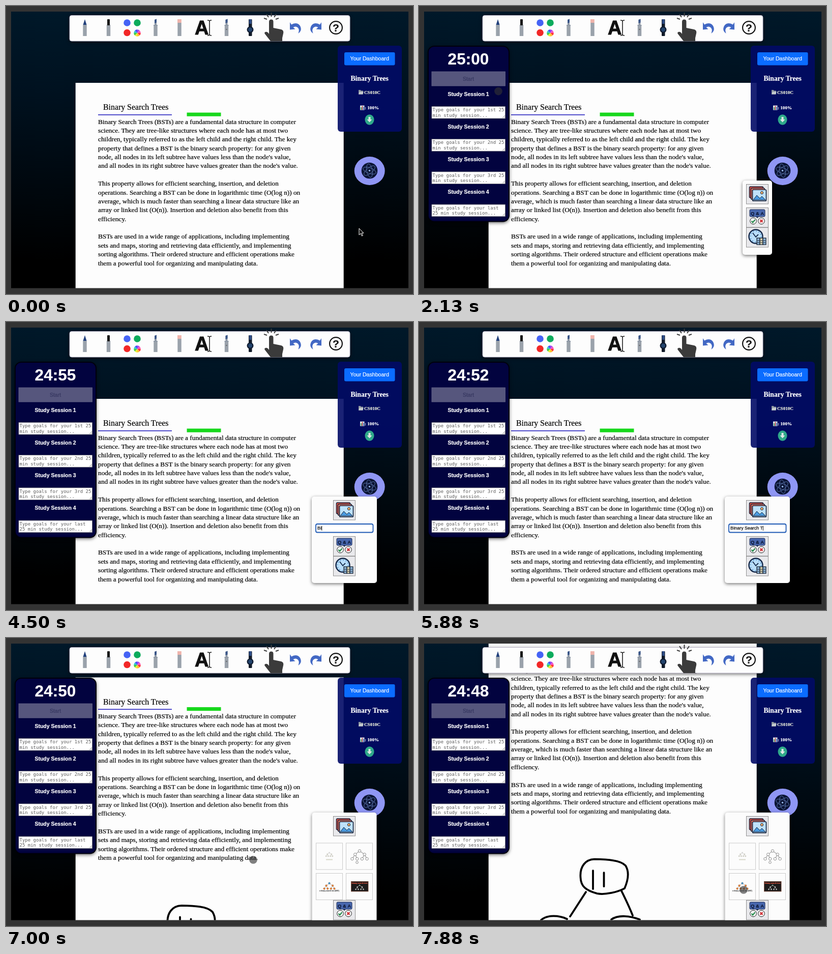
Animation of 800 by 566 pixels, one loop 8000 ms. Source, as an HTML page:

```html
<!DOCTYPE html>
<html lang="en">
<head>
<meta charset="utf-8">
<title>Study notes</title>
<style>
html, body { margin: 0; width: 100%; height: 100%; overflow: hidden; background: #333; }
svg { display: block; width: 800px; height: 566px; }
text { white-space: pre; fill: currentColor; stroke: currentColor; stroke-width: .2px; }
.serif { font-family: "Liberation Serif", serif; }
.sans { font-family: "Liberation Sans", sans-serif; }
.mono { font-family: "DejaVu Sans Mono", monospace; stroke: none; }
.bold { font-weight: bold; }
.mid { text-anchor: middle; }
.shadow { filter: drop-shadow(0 2px 3px #0008); }
.ink { fill: none; stroke: #000; stroke-width: 3.8; stroke-linecap: round; stroke-linejoin: round; }
</style>
</head>
<body>
<svg id="stage" viewBox="0 0 800 566"></svg>
<script>
const rect = (x, y, w, h, fill, more = '') =>
  `<rect x="${x}" y="${y}" width="${w}" height="${h}" fill="${fill}" ${more}/>`;
const disc = (x, y, r, fill, more = '') => `<circle cx="${x}" cy="${y}" r="${r}" fill="${fill}" ${more}/>`;
const path = (d, more = '') => `<path d="${d}" ${more}/>`;
const line = (d, color, width) => path(d, `fill="none" stroke="${color}" stroke-width="${width}"`);
const text = (x, y, size, cls, color, str, more = '') =>
  `<text x="${x}" y="${y}" font-size="${size}" class="${cls}" color="${color}" ${more}>${str}</text>`;
const group = (id, body, more = '') => `<g id="${id}" ${more}>${body}</g>`;

const notes = `Binary Search Trees (BSTs) are a fundamental data structure in computer
science. They are tree-like structures where each node has at most two
children, typically referred to as the left child and the right child. The key
property that defines a BST is the binary search property: for any given
node, all nodes in its left subtree have values less than the node's value,
and all nodes in its right subtree have values greater than the node's value.

This property allows for efficient searching, insertion, and deletion
operations. Searching a BST can be done in logarithmic time (O(log n)) on
average, which is much faster than searching a linear data structure like an
array or linked list (O(n)). Insertion and deletion also benefit from this
efficiency.

BSTs are used in a wide range of applications, including implementing
sets and maps, storing and retrieving data efficiently, and implementing
sorting algorithms. Their ordered structure and efficient operations make
them a powerful tool for organizing and manipulating data.`.split('\n');

function pageArt() {
  return rect(136.7, 151, 527, 900, '#fdfdfd')
    + text(191, 204.3, 15.85, 'serif', '#000', 'Binary Search Trees')
    + rect(181, 213, 145, 1.6, '#2a25c0')
    + rect(355.5, 209.5, 67, 7.2, '#17d81c')
    + notes.map((s, i) => text(181, 231.6 + i * 17.37, 13.28, 'serif', '#000', s)).join('')
    + path(`M317.500 635C316 614 327 600 345 599.500C370 600 396 601 406 612C414 625 411 641 404 657
      C391 664 366 670 350 667C328 661 318 653 317.500 635M342 622V658M363.500 626V653
      M328 664L297 712M398 662Q412 690 420 710
      M240 719C252 708 276 710 291 717M378 718C392 708 415 711 434 718`, 'class="ink"');
}

function toolbarArt() {
  const barrel = (x, tip) => rect(x - 3.7, 37, 7.4, 22, '#9aa2ab') + tip;
  const nib = x => path(`M${x - 2} 27l4-1.500V37h2v2h-8v-2h2z`, 'fill="#8e98a6"')
    + path(`M${x - 2} 27l4-1.500v7l-4 1.500z`, 'fill="#3a5688"');
  const pie = ['#f33', '#fb3', '#ee3', '#4c4', '#3cc', '#45f', '#a4e', '#f5b'].map((c, i) => {
    const p = a => `${258 + 6.8 * Math.cos(a)} ${53 + 6.8 * Math.sin(a)}`;
    return path(`M258 53L${p(i * Math.PI / 4)}A6.8 6.8 0 0 1 ${p((i + 1) * Math.PI / 4)}z`, `fill="${c}"`);
  }).join('');
  const undo = 'M558 32l3 4.500q13-6.500 18 4.500q3 8-4.500 13q3-9-1.500-12q-4-3-8.500 0l4 3.500-10.500 1z';
  return rect(125, 18.5, 551, 50.5, '#fdfdfd', 'rx="4" stroke="#b9b4c8" class="shadow"')
    + barrel(155, path('M155 26l3.5 11h-7z', 'fill="#22407c"'))
    + barrel(201.5, rect(199, 26, 5, 12, '#111', 'rx="1"'))
    + disc(238, 33, 6.8, '#4563f5') + disc(258, 33, 6.8, '#0cab5c')
    + disc(238, 52.5, 6.8, '#f22727') + pie
    + barrel(294, nib(294))
    + barrel(341, rect(337, 26, 7.8, 7, '#f0b4ac') + rect(337.3, 33, 7.4, 4, '#9aa2ab'))
    + text(371, 56, 38, 'sans bold', '#111', 'A', 'style="stroke-width:1px"')
    + line('M396 28q4 0 4 2q0-2 4-2M400 30V56M396 58q4 0 4-2q0 2 4 2', '#111', 1.5)
    + barrel(433.5, nib(433.5) + disc(433.5, 46, 1.2, '#666'))
    + rect(477, 26, 6.5, 33, '#111a28', 'rx="1"') + rect(478, 26, 4.5, 9, '#2d4c86')
    + disc(480, 46.5, 6.5, '#101c30') + disc(480, 46.5, 4, '#24456e')
    + path('M517 55V31q0-4.500 4.300-4.500T525.500 31V43l15 3q6 1.500 4.500 8l-2 9v6H520l-11-14q-2-3 1-4q4-1 7 4z', 'fill="#3b3b3b"')
    + line('M521.500 13V21M512 16l4 6M507 24l6 2M531 16l-4 6M536 24l-6 2', '#3b3b3b', 2)
    + path(undo, 'fill="#4268c4"')
    + path(undo, 'fill="#4268c4" transform="translate(1178 0) scale(-1 1)"')
    + disc(648.5, 42.5, 12.4, 'none', 'stroke="#111" stroke-width="2.200"')
    + text(648.5, 50, 21, 'sans bold mid', '#111', '?');
}

function dashboardArt() {
  return rect(652, 78, 126, 169, '#020a66', 'rx="6" fill-opacity=".9"')
    + rect(665, 91, 99.5, 25.5, '#0a6cff', 'rx="3"')
    + text(714.7, 107.3, 10.6, 'sans mid', '#fff', 'Your Dashboard')
    + text(714.7, 147, 13.6, 'serif bold mid', '#fff', 'Binary Trees')
    + path('M693 165h4l1 1.500h4v7h-9z', 'fill="#8d96a0"') + path('M693 173.500l2-5h8l-2 5z', 'fill="#c5cbd0"')
    + text(704, 172.7, 9.14, 'serif bold', '#eef0dc', 'CS010C')
    + rect(696, 195.500, 8.5, 9, '#dde4ea') + rect(697.2, 199, 1.7, 5, '#3a9a5c')
    + rect(699.5, 196.5, 1.7, 7.500, '#c64545') + rect(701.8, 198, 1.700, 6, '#3d70bd')
    + text(705, 203.3, 9.1, 'serif bold', '#fff', ': 100%')
    + '<ellipse cx="714.5" cy="223.5" rx="9" ry="10.200" fill="#2fa98a"/>'
    + path('M712.500 218h4v5h3l-5 5.500-5-5.500h3z', 'fill="#dfe6e6"');
}

function atomArt() {
  const orbit = a => `<ellipse cx="714.500" cy="323.500" rx="13.500" ry="5.500" fill="none" stroke="#5c76ae" stroke-width=".9" transform="rotate(${a} 714.500 323.500)"/>`;
  return '<ellipse id="halo" cx="714.700" cy="324" rx="30" ry="28"/>'
    + disc(714.5, 323.5, 15.8, '#0b1434') + [20, 80, 140].map(orbit).join('')
    + disc(714.5, 323.5, 1.8, '#8fb0e4');
}

function timerArt() {
  const goals = ['1st 25', '2nd 25', '3rd 25', 'last'].map((when, i) => {
    const y = i * 64.2;
    return text(97, 176.7 + y, 10.5, 'sans bold mid', '#fff', `Study Session ${i + 1}`)
      + rect(25, 197.5 + y, 144.500, 23.5, '#fff', 'stroke="#777" stroke-width=".7"')
      + text(26.5, 207.2 + y, 9, 'mono', '#5c5c5c', `Type goals for your ${when}`)
      + text(26.5, 217.5 + y, 9, 'mono', '#5c5c5c', `${i === 3 ? '25 ' : ''}min study session...`)
      + line(`M164 ${220 + y}l5-5M167 ${220 + y}l2-2`, '#777', .8);
  }).join('');
  return rect(18, 79, 159, 344.500, '#02033f', 'rx="12" stroke="#00000c" stroke-width="2" class="shadow"')
    + text(97, 115.3, 31.6, 'sans bold mid', '#fff', '25:00', 'id="clock"')
    + rect(25, 129, 144.5, 28, '#ebebeb', 'id="startBox" stroke-width=".8"')
    + text(97, 146.700, 10.500, 'sans mid', '#000', 'Start', 'id="startText"') + goals;
}

// Menu buttons are drawn from their own top-left corner.
const button = rect(.5, .5, 43, 38.5, '#e9e9ec', 'stroke="#858585" stroke-width=".9"');
const imagesIcon = button
  + rect(6.5, 5, 27, 22, '#e7503f', 'rx="2" stroke="#14233c" stroke-width="1.500"')
  + rect(9.5, 8, 27, 22, '#f27a60', 'rx="2" stroke="#14233c" stroke-width="1.500"')
  + rect(12.5, 11, 27, 22, '#bfe2fa', 'rx="2" stroke="#14233c" stroke-width="1.700"')
  + path('M14 31l7-9 6 6 4-4 7 7z', 'fill="#4a9be0" stroke="#14233c"') + disc(31, 17, 2.6, '#f6b26b', 'stroke="#14233c"');
const quizIcon = button
  + rect(7, 4, 30, 14, '#4867ae', 'rx="2" stroke="#1c2c55"') + path('M19 18l3 3 3-3z', 'fill="#1c2c55"')
  + text(22, 14.700, 9.5, 'sans bold mid', '#0d1733', 'Q &amp; A')
  + disc(14, 26.500, 6.3, '#f5f5f5', 'stroke="#222"') + line('M10.500 26.500l2.500 3 4.500-5.500', '#238a4a', 2.200)
  + disc(30, 26.500, 6.3, '#f5f5f5', 'stroke="#222"') + line('M27.500 24l5 5m0-5l-5 5', '#d22f35', 2.300);
const clockIcon = button
  + disc(19, 18, 13.5, '#b9defa', 'stroke="#15294a" stroke-width="2.400"')
  + disc(19, 18, 10.500, 'none', 'stroke="#3177b9" stroke-width="1.500" stroke-dasharray="1.500 4"')
  + line('M13 11l6 8 5-5', '#15294a', 1.800)
  + [21, 27, 33].map((x, i) => rect(x, 21, 6, 13, ['#8eb5d8', '#d9d2b0', '#8eb5d8'][i], 'stroke="#1a2535" stroke-width="1.300"')
    + line(`M${x + 1} 26h4m-4 4h4`, '#1a2535', 1)).join('');

function tree(x, y, s, ink, dot, root, r) {
  const nodes = [[0, 0], [-9, 7], [10, 7], [-15, 16], [-5, 16], [5, 16], [15, 16]]
    .map(([a, b]) => [x + a * s, y + b * s]);
  const edges = nodes.slice(1).map((n, i) => `M${nodes[i >> 1]}L${n}`).join('');
  return line(edges, ink, .7)
    + nodes.map((n, i) => disc(...n, r, i ? dot : root, `stroke="${ink}" stroke-width=".600"`)).join('');
}

function resultsArt() {
  const cells = [[609.5, 403], [668.5, 403], [609.500, 462.5], [668.5, 462.5]];
  return cells.map(([x, y]) => rect(x, y, 52, 52, '#fcfcfc', 'stroke="#c6c6c6" stroke-width=".9"')).join('')
    + tree(635.5, 422, .42, '#ccc', '#d5d2bd', '#ddd', 1.2) + rect(629, 434.5, 13, 2, '#d8d8ca')
    + tree(695, 418.5, .97, '#444', '#fff', '#fff', 2.700) + disc(690, 441, 2.300, '#fff', 'stroke="#444" stroke-width=".600"')
    + tree(635.500, 482, .66, '#9a8a80', '#ef7d28', '#3198dc', 1.900)
    + text(635.500, 498, 3.1, 'sans bold mid', '#555', 'a binary search tree (BST)')
    + rect(678.5, 478.500, 33.5, 19.5, '#1d1b1b', 'stroke="#7a4430" stroke-width=".800"')
    + text(695, 482.6, 3.6, 'sans bold mid', '#e0523c', 'binary search tree')
    + tree(695, 486, .5, '#bbb', '#ddd', '#4cb08a', 1);
}

const menuArt = rect(636, 343, 58, 146, '#fcfcfc', 'id="menuBox" rx="5" class="shadow"')
  + group('images', imagesIcon, 'transform="translate(643 350)"')
  + group('clockButton', clockIcon) + group('quiz', quizIcon)
  + group('field', rect(609, 397, 112.5, 16.5, '#fff', 'rx="3" stroke="#1c58b4" stroke-width="1.800"')
    + text(612, 408.3, 8.87, 'sans', '#000', '', 'id="typed"') + rect(612, 400.500, .9, 9.500, '#000', 'id="caret"'))
  + group('results', resultsArt());

const cursorArt = group('arrow', path('M-3 -7V6l3.200-3 2.200 5 2-1-2.200-4.800H6z', 'fill="#111" stroke="#fff" stroke-width="1"'))
  + disc(0, 0, 7.8, '#333', 'id="dot" opacity=".62"');

stage.innerHTML = `<defs>
  <linearGradient id="sky" x2="0" y2="1"><stop stop-color="#001829"/><stop offset=".3" stop-color="#00111f"/><stop offset=".9" stop-color="#000"/></linearGradient>
  <clipPath id="screen"><rect x="10" y="11" width="781" height="543.5"/></clipPath></defs>`
  + rect(0, 0, 800, 566, '#333')
  + `<g clip-path="url(#screen)">` + rect(10, 11, 781, 544, 'url(#sky)')
  + group('page', pageArt()) + group('toolbar', toolbarArt()) + group('dashboard', dashboardArt())
  + group('atom', atomArt()) + group('timer', timerArt()) + group('menu', menuArt)
  + group('cursor', cursorArt) + '</g>';

const el = id => document.getElementById(id);
const show = (id, on) => el(id).style.display = on ? '' : 'none';
const set = (id, attrs) => { for (const k in attrs) el(id).setAttribute(k, attrs[k]); };

// Keys are [time, ...values]; values ease between neighbours.
function along(keys, t) {
  const i = keys.findIndex(k => k[0] > t);
  if (i < 0) return keys.at(-1).slice(1);
  if (!i) return keys[0].slice(1);
  const a = keys[i - 1], b = keys[i], u = (t - a[0]) / (b[0] - a[0]), e = u * u * (3 - 2 * u);
  return a.slice(1).map((v, j) => v + (b[j + 1] - v) * e);
}

const pointer = [[0, 697, 444], [125, 697, 444], [500, 716, 326], [700, 716, 326], [1000, 672, 458],
  [1250, 672, 458], [1750, 97, 144], [2000, 97, 144], [2625, 664, 371], [3000, 664, 371],
  [3375, 668, 405], [6400, 668, 405], [6750, 486, 436], [7250, 486, 436], [7750, 638, 495]];
const scroll = [[6750, 0], [7000, 73.6], [7375, 164.8]];
const query = 'BInary Search Trees';
const started = 1850;

function draw(t) {
  set('page', { transform: `translate(0 ${-along(scroll, t)[0]})` });

  const running = t >= started;
  const left = 1500 - (running ? Math.floor((t - started) / 490) : 0);
  show('timer', t >= 1125);
  el('clock').textContent = `${Math.floor(left / 60)}:${String(left % 60).padStart(2, '0')}`;
  set('startBox', { fill: running ? '#56567d' : '#ebebeb', stroke: running ? '#646487' : '#888' });
  set('startText', { color: running ? '#363760' : '#000' });
  set('halo', { fill: t >= 500 && t < 2000 ? '#6d74c6' : '#8f96f4' });

  const asking = t >= 2875 && t < 6500, found = t >= 6500;
  const [x, w, h, y] = found ? [601.5, 127, 260, 515] : asking ? [601, 128, 170, 421] : [636, 58, 146, 396];
  show('menu', t >= 625);
  set('menuBox', { x, width: w, height: h });
  set('quiz', { transform: `translate(643 ${y})` });
  set('clockButton', { transform: `translate(643 ${y + 39})` });
  show('field', asking);
  show('results', found);

  const count = Math.max(0, Math.min(query.length, Math.floor((t - 4280) / 106)));
  el('typed').textContent = count ? query.slice(0, count) : 'Enter Something Specific...';
  set('typed', { color: count ? '#000' : '#757575' });
  show('caret', count || (t - 2875) % 530 < 265);
  if (asking) set('caret', { x: 612 + (count ? el('typed').getComputedTextLength() : 0) });

  const [px, py] = along(pointer, t);
  set('cursor', { transform: `translate(${px} ${py})` });
  show('cursor', t < 4000 || t >= 6400);
  show('arrow', t < 375);
  show('dot', t >= 375);
}

const origin = performance.now();
function tick() {
  const t = (performance.now() - origin) % 8000;
  draw(Math.floor(t / 125) * 125);
  requestAnimationFrame(tick);
}
tick();
</script>
</body>
</html>
```
